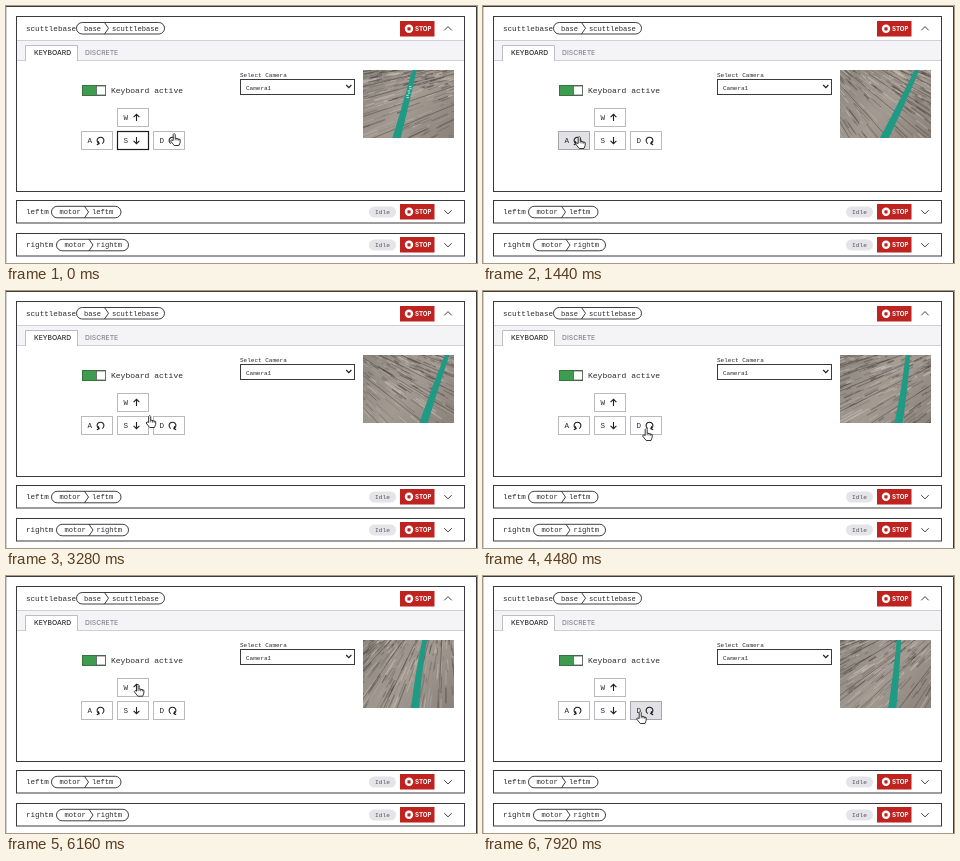
Write an HTML page with a canvas that moves like this. It is 471x257 px and loops after 8 s.

```html
<!DOCTYPE html>
<html lang="en">
<head>
<meta charset="utf-8">
<title>Base control panel</title>
<style>
  html, body { margin: 0; width: 100%; height: 100%; overflow: hidden; background: #fff; }
  svg, canvas { position: absolute; display: block; }
  svg { left: 0; top: 0; }
  canvas { left: 357px; top: 64px; width: 91px; height: 68px; }
  text { font: 7.1px "Liberation Mono", "Noto Sans Mono", monospace; fill: #2b2b2f; white-space: pre; }
  .title { font-size: 7.6px; }
  .big { font-size: 8px; }
  .small { font-size: 6px; }
  .idle { font-size: 6.2px; fill: #55555c; }
  .tab { font: 500 6.8px Inter, Roboto, sans-serif; }
  .off { fill: #85858c; }
  .stop { font: 700 6.1px Inter, Roboto, sans-serif; fill: #fff; }
  .line { fill: none; stroke: #3a3a3e; }
  .thin { fill: none; stroke: #2b2b2f; stroke-width: .9; }
  .key rect { fill: #fff; stroke: #b9b9bf; }
  .key.down rect { fill: #e1e1e6; stroke: #a5a5ad; }
  .key.focus rect { stroke: #1d1d20; stroke-width: 1.2; }
  .key path { fill: none; stroke: #1f1f22; stroke-width: 1.1; }
</style>
</head>
<body>
<svg width="471" height="257" viewBox="0 0 471 257">
  <defs>
    <g id="stop">
      <rect width="34.5" height="15.5" fill="#be2320"/>
      <circle cx="9" cy="7.8" r="4.2" fill="#fff"/>
      <rect x="7.4" y="6.2" width="3.2" height="3.2" rx=".6" fill="#be2320"/>
      <text class="stop" x="15" y="10.1">STOP</text>
    </g>
    <g id="idle">
      <rect width="27" height="11" rx="5.5" fill="#e4e4e9"/>
      <text class="idle" x="6" y="7.7">Idle</text>
    </g>
    <path id="chev" class="thin" d="M-3.7 -1.8L0 1.9L3.7 -1.8"/>
  </defs>

  <path d="M0 .5H470.5V257" fill="none" stroke="#3c3c3c"/>
  <path d="M.5 1V257" stroke="#d0d0d0"/>

  <rect class="line" x="10.5" y="10.5" width="448" height="175"/>
  <text class="title" x="20" y="24.8">scuttlebase</text>
  <rect class="thin" x="70.5" y="16.5" width="88" height="11.5" rx="5.75"/>
  <path class="thin" d="M98.5 16.5l4 5.75l-4 5.75"/>
  <text x="78" y="24.7">base</text>
  <text x="106" y="24.7">scuttlebase</text>
  <use href="#stop" x="394" y="15"/>
  <use href="#chev" transform="translate(442 22.5) scale(1 -1)"/>

  <rect x="11" y="34" width="447" height="21" fill="#f4f4f6"/>
  <path d="M11 34.5H458M11 54.5H458" stroke="#cfcfd4"/>
  <rect x="20" y="39" width="51" height="17" fill="#fff"/>
  <path d="M19.5 55V39.5H71.5V55" fill="none" stroke="#bdbdc3"/>
  <text class="tab" x="28" y="49.2">KEYBOARD</text>
  <text class="tab off" x="79" y="49.2">DISCRETE</text>

  <rect x="76.5" y="79.5" width="23" height="10" fill="#3d9c50" stroke="#39713f"/>
  <rect x="90.5" y="80" width="9" height="9" fill="#fff" stroke="#5b5b5f" stroke-width=".8"/>
  <text class="big" x="105" y="87.3">Keyboard active</text>

  <text class="small" x="234" y="70.6">Select Camera</text>
  <rect class="line" x="234.5" y="73.5" width="114" height="15"/>
  <text class="small" x="240" y="83.5">Camera1</text>
  <path d="M340.2 79l2.6 2.7l2.6 -2.7" fill="none" stroke="#222" stroke-width="1.2"/>

  <g id="keys"></g>
  <g id="rows"></g>
  <g id="hand" stroke="#222" stroke-width=".9" stroke-linejoin="round">
    <path d="M3.2 7.5V1.5Q4.2 -.5 5.2 1.5V5L10.2 6.5V9.3L9 12.5H4.2L.6 8Q1 6 3.2 7.5Z" fill="#fff"/>
    <path d="M5.2 5v2.3M7 5.5v2M8.7 6v1.7" stroke-width=".7"/>
  </g>
</svg>
<canvas id="cam"></canvas>

<script>
const LOOP = 8000, STEP = 80, W = 91, H = 68;
const $ = id => document.getElementById(id);

const turn = '<path d="M-1.6 3.1A3.4 3.4 0 1 1 1.6 3.1M3.7 4.2L1.3 3.1L2.2 .8"/>';
const arrow = '<path d="M0 3.6V-3M-2.9 -.3L0 -3.2L2.9 -.3"/>';
const keys = {
  W: [111, 102, arrow, "1"],
  A: [75, 125, turn, "-1 1"],
  S: [111, 125, arrow, "1 -1"],
  D: [147, 125, turn, "1"]
};
$("keys").innerHTML = Object.entries(keys).map(([k, [x, y, icon, flip]]) =>
  `<g class="key" id="key${k}" transform="translate(${x} ${y})">
    <rect x=".5" y=".5" width="31" height="18"/>
    <text class="title" x="6.5" y="12.2">${k}</text>
    <g transform="translate(19.5 9.5) scale(${flip})">${icon}</g></g>`).join("");

const row = (y, name, x, mid, end) =>
  `<g transform="translate(0 ${y})">
    <rect class="line" x="10.5" y=".5" width="448" height="22.5"/>
    <text class="title" x="20" y="14.3">${name}</text>
    <rect class="thin" x="${x}" y="6.3" width="${end - x}" height="11.5" rx="5.75"/>
    <path class="thin" d="M${mid} 6.3l4 5.75l-4 5.75"/>
    <text x="${x + 8}" y="14.3">motor</text>
    <text x="${mid + 7.5}" y="14.3">${name}</text>
    <use href="#idle" x="363" y="6.5"/>
    <use href="#stop" x="394" y="4"/>
    <use href="#chev" x="442" y="12"/></g>`;
$("rows").innerHTML = row(194, "leftm", 45.5, 78.5, 115) + row(227, "rightm", 50.5, 83, 122.5);

// key, press start, press end
const presses = [["D", 80, 400], ["A", 1040, 1520], ["W", 2160, 2960], ["D", 3600, 4240],
  ["W", 5360, 6000], ["S", 6560, 7040], ["D", 7600, 8000]];

// rest from, rest until, x, y
const handRests = [[0, 400, 164, 127], [640, 640, 148, 127], [960, 1600, 92, 130],
  [2080, 3040, 120, 111], [3520, 4480, 159, 137], [5200, 6080, 128, 105],
  [6480, 7120, 125, 131], [7520, 8000, 153, 135]];

// rest from, rest until, tape top x, middle x, middle y, bottom x, floor angle, floor travel
const views = [
  [0, 80, 52, 43, 33, 33, -20, 0],
  [400, 1040, 12, 7, 34, -20, 50, 0],
  [1520, 2160, 91, 72, 34, 56, 40, 0],
  [2960, 3600, 85, 72, 34, 60, 34, 70],
  [4240, 5360, 68, 64, 34, 58, -28, 70],
  [5600, 5600, 52, 48, 34, 44, -70, 95],
  [6000, 6560, 62, 56, 34, 52, -70, 135],
  [6880, 6880, 77, 57, 8, 58, -70, 105],
  [7040, 7600, 73, 58, 12, 58, -66, 92],
  [7920, 8000, 59, 56, 34, 52, -42, 92]];

function sample(rests, t, ease) {
  const i = rests.findIndex(r => t <= r[1]);
  const b = rests[i];
  if (t >= b[0]) return b.slice(2);
  const a = rests[i - 1];
  let p = (t - a[1]) / (b[0] - a[1]);
  if (ease) p = p * p * (3 - 2 * p);
  return a.map((v, n) => v + (b[n] - v) * p).slice(2);
}

let seed = 7;
const rnd = () => (seed = (seed * 16807) % 2147483647) / 2147483647;
const TILE = 260;
const grain = Array.from({ length: 1500 }, () => ({
  u: rnd() * TILE, v: Math.floor(rnd() * 130) * 2 + rnd(), len: 4 + rnd() * 20,
  dark: rnd() < .58, a: .15 + rnd() * .4, w: .6 + rnd() * .9
}));

const cam = $("cam"), g = cam.getContext("2d");
const ratio = window.devicePixelRatio || 1;
cam.width = Math.round(W * ratio);
cam.height = Math.round(H * ratio);
g.scale(cam.width / W, cam.height / H);

const wrap = v => ((v % TILE) + TILE) % TILE - TILE / 2;
// floor plane in perspective, horizon above the picture
const project = (x, z) => [W / 2 + x * 100 / z, 10000 / z - 60];

function floor(angle, travel) {
  const r = -angle * Math.PI / 180, c = Math.cos(r), s = Math.sin(r);
  const shade = g.createLinearGradient(0, 0, W, H);
  shade.addColorStop(0, "#8c867f");
  shade.addColorStop(.5, "#a39b92");
  shade.addColorStop(1, "#8a827a");
  g.fillStyle = shade;
  g.fillRect(0, 0, W, H);
  const streak = (u, v, len, color, width) => {
    const x = u * c - v * s, z = u * s + v * c + 120, z2 = z + len * s;
    if (z < 62 || z2 < 62 || z > 200) return;
    g.strokeStyle = color;
    g.lineWidth = width;
    g.beginPath();
    g.moveTo(...project(x, z));
    g.lineTo(...project(x + len * c, z2));
    g.stroke();
  };
  const du = -travel * s, dv = -travel * c;
  for (const k of grain)
    streak(wrap(k.u + du), wrap(k.v + dv), k.len,
      `rgba(${k.dark ? "76,69,64" : "208,200,190"},${k.a})`, k.w);
  for (let v = 0; v < TILE; v += 20)
    for (let u = -130; u < 130; u += 13)
      streak(u, wrap(v + dv), 13, "rgba(62,56,52,.5)", .9);
}

function tape(x0, mx, my, x1) {
  const y0 = -2, y1 = 70, left = [], right = [];
  // control point chosen so the curve passes through the middle point
  const qx = 2 * mx - (x0 + x1) / 2, qy = 2 * my - (y0 + y1) / 2;
  const at = (a, q, b, p) => (1 - p) * (1 - p) * a + 2 * p * (1 - p) * q + p * p * b;
  const slope = (a, q, b, p) => (1 - p) * (q - a) + p * (b - q);
  for (let p = 0; p <= 1; p += 1 / 32) {
    const x = at(x0, qx, x1, p), y = at(y0, qy, y1, p);
    const dx = slope(x0, qx, x1, p), dy = slope(y0, qy, y1, p), d = Math.hypot(dx, dy) || 1;
    const w = 2.2 + 1.8 * Math.max(0, y) / H;
    left.push([x - dy / d * w, y + dx / d * w]);
    right.unshift([x + dy / d * w, y - dx / d * w]);
  }
  g.fillStyle = "#1f9a84";
  g.beginPath();
  for (const q of left.concat(right)) g.lineTo(...q);
  g.fill();
}

function glints(x, alpha) {
  g.fillStyle = `rgba(215,240,232,${alpha})`;
  for (let i = 0; i < 6; i++) g.fillRect(x - i * .7 + i % 2, 16 + i * 2.2, 2.4, 1.1);
}

function draw(t) {
  const [x, y] = sample(handRests, t, true);
  $("hand").setAttribute("transform", `translate(${x.toFixed(2)} ${y.toFixed(2)})`);

  const press = presses.find(p => t >= p[1] && t < p[2]);
  for (const k in keys) {
    const list = $("key" + k).classList;
    list.toggle("down", !!press && press[0] === k);
    list.toggle("focus", k === "S" && t < 80);
  }

  const [x0, mx, my, x1, angle, travel] = sample(views, t, false);
  const fast = t > 5400 && t < 6000;
  g.filter = `blur(${(fast ? .8 : .3) * ratio}px)`;
  floor(angle, travel);
  tape(x0, mx, my, x1);
  if (t < 320) glints(x0 - 6, .8 * (1 - t / 320));
}

let start, last = -1;
function tick(now) {
  start ??= now;
  const t = Math.floor((now - start) % LOOP / STEP) * STEP;
  if (t !== last) draw(t);
  last = t;
  requestAnimationFrame(tick);
}
requestAnimationFrame(tick);
</script>
</body>
</html>
```
